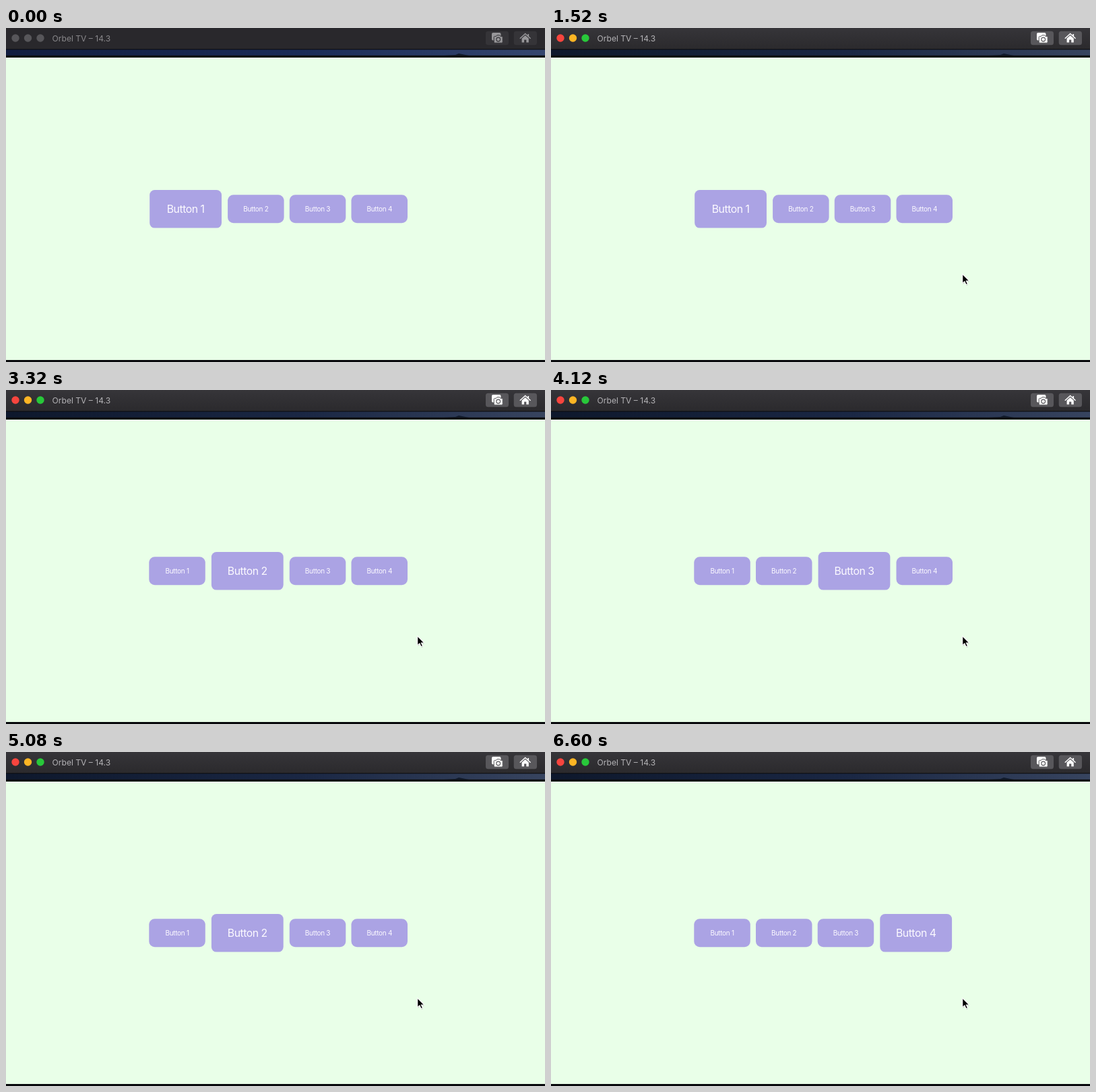
Write an HTML page that moves like this. It is 800 px wide and 497 px high and loops after 6.64 s.

```html
<!DOCTYPE html>
<html lang="en">
<head>
<meta charset="utf-8">
<title>Focus demo</title>
<style>
  html, body { margin: 0; width: 100%; height: 100%; overflow: hidden; background: #e9ffe8; }
  svg { display: block; width: 800px; height: 497px; font-family: Inter, Roboto, sans-serif;
    --bar1: #29282c; --bar2: #29282c; --title: #89888b; --tool: #353438; --icon: #98979a;
    --red: #57565a; --amber: #57565a; --green: #57565a;
    --sky1: #121d40; --sky2: #1a2b58; --sky3: #35466f; }
  svg.active { --bar1: #363539; --bar2: #2b2a2d; --title: #b3b2b5; --tool: #58575b; --icon: #fff;
    --red: #f8453e; --amber: #fdb524; --green: #28c83a;
    --sky1: #0e182c; --sky2: #1a2744; --sky3: #37445f; }
  .tool { fill: var(--tool); }
  .icon { fill: var(--icon); }
  #buttons rect { fill: #aba3e4; }
  #buttons text { fill: #fcfaff; text-anchor: middle; letter-spacing: -.03em; }
</style>
</head>
<body>
<svg id="stage" viewBox="0 0 800 497">
  <defs>
    <linearGradient id="bar" x2="0" y2="1">
      <stop style="stop-color:var(--bar1)"/>
      <stop offset="1" style="stop-color:var(--bar2)"/>
    </linearGradient>
    <linearGradient id="sky">
      <stop style="stop-color:var(--sky1)"/>
      <stop offset=".55" style="stop-color:var(--sky2)"/>
      <stop offset="1" style="stop-color:var(--sky3)"/>
    </linearGradient>
  </defs>
  <rect width="800" height="497" fill="#e9ffe8"/>
  <rect width="800" height="44" fill="#08090c"/>
  <rect width="800" height="31.3" fill="url(#bar)"/>
  <rect y="32.3" width="800" height="8.5" fill="url(#sky)"/>
  <path d="M650 41l17-1 5-2 5 1 10 2z" fill="#111a2b"/>
  <rect y="494" width="800" height="3" fill="#08090c"/>

  <circle cx="14" cy="15" r="5.7" fill="var(--red)"/>
  <circle cx="32.5" cy="15" r="5.7" fill="var(--amber)"/>
  <circle cx="51" cy="15" r="5.7" fill="var(--green)"/>
  <text x="68.5" y="19.5" font-size="12.1" fill="var(--title)">Orbel TV – 14.3</text>

  <rect class="tool" x="712" y="4.7" width="34" height="20.5" rx="3.5"/>
  <rect class="icon" x="721" y="7" width="13.5" height="11.5" rx="2"/>
  <path class="icon" d="M725.5 12.4h2l1.2-1.6h4l1.2 1.6h2q1.3 0 1.3 1.3v7q0 1.5-1.5 1.5h-10q-1.5 0-1.5-1.5v-7q0-1.3 1.3-1.3z" stroke="var(--tool)"/>
  <circle cx="730.7" cy="17" r="2.9" fill="none" stroke="var(--tool)" stroke-width="1.1"/>

  <rect class="tool" x="753.7" y="4.7" width="34.3" height="20.5" rx="3.5"/>
  <path d="M763.3 15.2l7.4-6.7 7.4 6.7" fill="none" stroke="var(--icon)" stroke-width="1.5" stroke-linecap="round"/>
  <path class="icon" d="M774.3 9h1.8v4l-1.8-1.6zM765.6 15.6l5.1-4.6 5.1 4.6v6h-3.5v-4h-3.2v4h-3.5z"/>

  <g id="buttons"></g>
  <g id="cursor">
    <path d="M0 0v14l3.2-2.9 2.2 4.9 2.4-1-2.1-4.8h4.3z" transform="translate(.4 1.3)" fill="#000" opacity=".2"/>
    <path d="M0 0v14l3.2-2.9 2.2 4.9 2.4-1-2.1-4.8h4.3z" fill="#000" stroke="#fff" stroke-width="1.1"/>
  </g>
</svg>
<script>
const LOOP = 6640, TWEEN = 140, ACTIVATE = 1160;
// [start time, index of the focused button]
const moves = [[0, 0], [2880, 1], [3580, 2], [4360, 1], [5240, 0], [5880, 1], [6240, 2], [6440, 3]];

const stage = document.getElementById('stage');
const cursor = document.getElementById('cursor');
const group = document.getElementById('buttons');

function add(tag, attrs) {
  const el = document.createElementNS('http://www.w3.org/2000/svg', tag);
  set(el, attrs);
  return group.appendChild(el);
}
function set(el, attrs) {
  for (const key in attrs) el.setAttribute(key, attrs[key]);
}
const mix = (a, b, p) => a + (b - a) * p;
const clamp = v => Math.min(1, Math.max(0, v));
const smooth = p => p * p * (3 - 2 * p);

const buttons = [1, 2, 3, 4].map(n => {
  const button = { box: add('rect', {}), label: add('text', {}) };
  button.label.textContent = 'Button ' + n;
  return button;
});

function drawButtons(t) {
  const step = moves.findLastIndex(m => m[0] <= t);
  const [start, now] = moves[step];
  const before = step ? moves[step - 1][1] : now;
  const p = smooth(clamp((t - start) / TWEEN));
  let left = 212.3;
  buttons.forEach(({ box, label }, i) => {
    const focus = (i === before ? 1 - p : 0) + (i === now ? p : 0);
    const width = mix(83.5, 106.8, focus), height = mix(42, 56.6, focus);
    const x = left + focus * .9;
    set(box, { x, y: 269.3 - height / 2, width, height, rx: mix(8.5, 7.5, focus) });
    set(label, { x: x + width / 2, y: mix(272.8, 275.3, focus), 'font-size': mix(10, 15.8, focus) });
    left += 91.7 + 25.1 * focus;
  });
}

function drawCursor(t) {
  const p = 1 - (1 - clamp((t - 360) / 400)) ** 2;
  cursor.style.display = t < 360 ? 'none' : '';
  set(cursor, { transform: `translate(${mix(800, 610.7, p)} ${mix(444, 366, p)})` });
}

function frame(now) {
  const t = now % LOOP;
  stage.classList.toggle('active', t >= ACTIVATE);
  drawButtons(t);
  drawCursor(t);
  requestAnimationFrame(frame);
}
frame(0);
</script>
</body>
</html>
```
